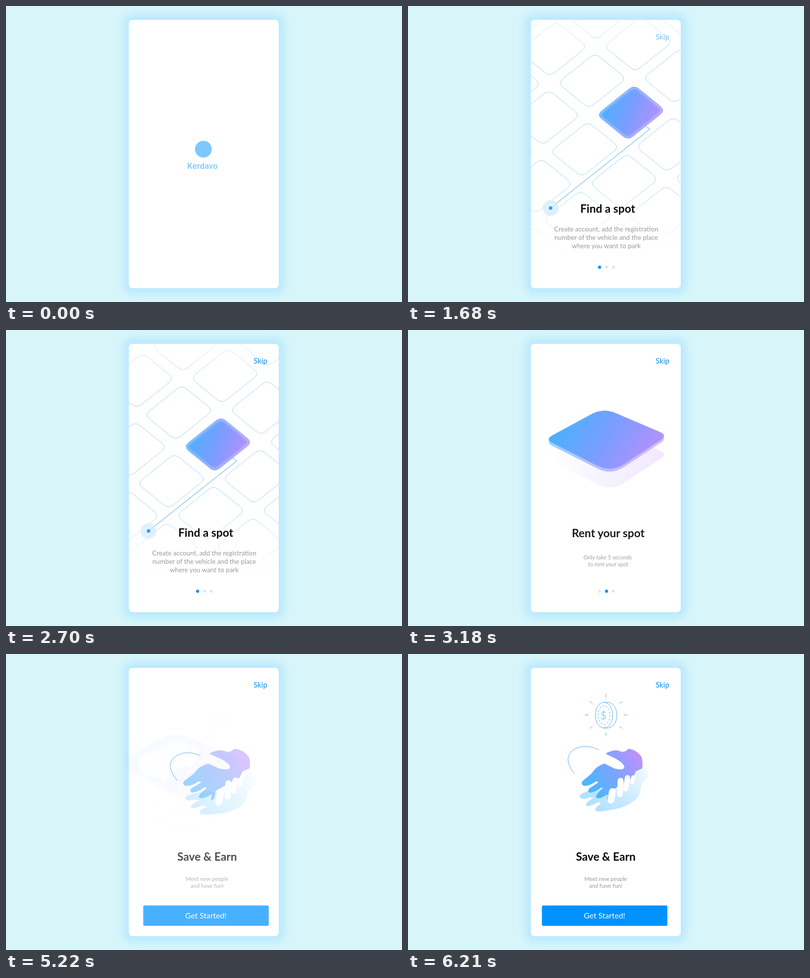
These frames come from a looping animation (800x600 px, 7.44 s). An HTML page:

```html
<!DOCTYPE html>
<html lang="en">
<head>
<meta charset="utf-8">
<title>Parking app onboarding</title>
<style>
html, body { margin: 0; width: 100%; height: 100%; overflow: hidden; background: #d8f6fa; }
svg { display: block; width: 100vw; height: 100vh; }
text { font-family: Lato, Carlito, sans-serif; text-anchor: middle; }
.title { font-weight: 700; font-size: 22.7px; fill: #0a0a0c; }
.body { fill: #999; }
.line { fill: none; stroke: #57ace2; stroke-width: 1; }
.draw { stroke-dasharray: 1; }
</style>
</head>
<body>
<svg viewBox="0 0 800 600">
  <defs>
    <filter id="glow" x="-20%" y="-20%" width="140%" height="140%"><feGaussianBlur stdDeviation="9"/></filter>
    <filter id="soft"><feGaussianBlur stdDeviation="2.5"/></filter>
    <clipPath id="card"><rect x="248" y="28" width="303" height="544" rx="8"/></clipPath>
    <linearGradient id="slab" x1="0" y1=".35" x2="1" y2=".65">
      <stop offset=".05" stop-color="#4cb0ff"/><stop offset=".5" stop-color="#7b9dff"/><stop offset="1" stop-color="#bd8efc"/>
    </linearGradient>
    <linearGradient id="under" x1="0" y1=".4" x2="1" y2=".6">
      <stop offset=".05" stop-color="#fff"/><stop offset=".45" stop-color="#f4f0ff"/><stop offset="1" stop-color="#ecdcff"/>
    </linearGradient>
    <linearGradient id="skin" x1="0" y1=".7" x2="1" y2=".2">
      <stop offset=".08" stop-color="#4db6fb"/><stop offset=".55" stop-color="#7fa3fd"/><stop offset=".95" stop-color="#bb92ff"/>
    </linearGradient>
    <linearGradient id="shade" x1="0" y1=".8" x2="1" y2=".2">
      <stop offset="0" stop-color="#aadfff"/><stop offset=".55" stop-color="#cdeaff"/><stop offset="1" stop-color="#eef9ff"/>
    </linearGradient>
    <linearGradient id="edges" gradientUnits="userSpaceOnUse" x1="0" y1="28" x2="0" y2="508">
      <stop offset="0" stop-color="#666"/><stop offset=".16" stop-color="#fff"/><stop offset=".7" stop-color="#fff"/>
      <stop offset=".9" stop-color="#444"/><stop offset="1" stop-color="#000"/>
    </linearGradient>
    <linearGradient id="sweep" gradientUnits="userSpaceOnUse" y1="0" y2="0">
      <stop offset="0" stop-color="#000"/><stop offset="1" stop-color="#fff"/>
    </linearGradient>
    <mask id="fade" maskUnits="userSpaceOnUse" x="0" y="0" width="800" height="600"><rect width="800" height="600" fill="url(#edges)"/></mask>
    <mask id="wipe" maskUnits="userSpaceOnUse" x="0" y="0" width="800" height="600"><rect width="800" height="600" fill="url(#sweep)"/></mask>
  </defs>

  <rect width="800" height="600" fill="#d8f6fa"/>
  <rect x="237" y="17" width="325" height="566" rx="16" fill="#b7e8fe" filter="url(#glow)"/>
  <rect x="248" y="28" width="303" height="544" rx="8" fill="#fff"/>

  <g clip-path="url(#card)">
    <g id="brand" fill="#0092ff">
      <circle cx="398" cy="284" r="29"/>
      <text x="395" y="352" style="font:500 29px Roboto,sans-serif">Kerdavo</text>
    </g>

    <g id="map" mask="url(#wipe)">
      <g mask="url(#fade)"><g id="grid" fill="none" stroke="#a6d3ee"></g></g>
      <path id="route" class="line" style="stroke:#3d9ce8"/>
      <g id="here"><circle r="16" fill="#d5ecfd" opacity=".75"/><circle r="3.6" fill="#319df0"/></g>
    </g>

    <g id="stack">
      <path id="layer" fill="url(#under)"/>
      <path id="base" class="line draw" pathLength="1" style="stroke:#9fcfec"
        d="M295 285Q284 295 300 303L388 346Q414 359 438 346L507 301Q520 291 509 279"/>
      <path id="side" fill="url(#slab)"/>
      <path id="top" fill="url(#slab)"/>
      <path id="rim" fill="none" stroke="#fff" stroke-width="6" filter="url(#soft)"/>
      <path id="hem" fill="none" stroke="#6f92ee"/>
      <path id="flag" class="line draw" pathLength="1"/>
      <path id="foot" d="M463.5 194V205" stroke="#fff" opacity=".7"/>
      <g id="auto">
        <path d="M336 212Q337 198 350 194L398 173Q420 167 440 178L458 185Q460 196 455 203L398 234L372 244Q345 236 338 230Z" fill="#fff" opacity=".72"/>
        <path d="M376 206L384 190Q402 175 425 174Q440 178 446 186Q430 197 376 212Z" fill="#9fa9ff" opacity=".2"/>
        <circle cx="405" cy="193" r="11" fill="#fff" opacity=".6"/>
        <path d="M346 198L374 208L366 223Q350 220 341 210Z" fill="#fff" opacity=".75"/>
        <path d="M338 217L350 222L350 229L340 226ZM361 228L374 231L371 239L361 236Z" fill="#fff" opacity=".7"/>
        <g id="wheels"></g>
      </g>
    </g>

    <g id="deal">
      <path id="sleeve" class="line" d="M385 194Q362 183 342 190Q324 197 323 214Q325 230 337 243"/>
      <path id="back" fill="url(#shade)" d="M473 227L461 236Q450 250 420 275L395 270L375 275Q345 282 347 290Q350 296 366 291L376 291Q356 302 361 308Q366 310 385 300L390 303Q376 312 379 318Q384 321 410 316Q440 312 462 294Q470 285 471 268Q473 261 485 248Q487 236 473 227Z"/>
      <path id="front" fill="url(#skin)" d="M399 202Q414 193 426 196Q437 202 445 192Q462 194 472 209Q475 222 473 232L460 238L455 250L426 268L411 277L408 292Q405 298 402 295L404 284Q394 290 388 292Q379 294 380 287Q384 280 394 272L391 270Q375 282 367 281Q361 278 367 272L385 260L380 258Q365 269 355 267Q348 264 353 257Q362 250 371 242Q380 227 397 222L417 232Q434 237 437 230Q437 222 421 213Z"/>
      <g id="fingers" stroke="#fff" stroke-linecap="round">
        <path d="M413 279L410 296" stroke-width="14"/><path d="M429.500 257L428 284" stroke-width="12"/>
        <path d="M443.500 251L440 273" stroke-width="11"/><path d="M455 250L453 260" stroke-width="8"/>
      </g>
    </g>

    <g id="coin" class="line">
      <g id="rays"></g>
      <ellipse cx="396" cy="124" rx="17.500" ry="26"/>
      <path d="M396 98H403A19 26 0 0 1 403 150H396"/>
      <ellipse cx="396" cy="124" rx="12" ry="19" stroke-dasharray="4 3"/>
      <text x="395" y="131.500" fill="#4aa5e6" stroke="none" font-size="21" font-weight="300">$</text>
    </g>

    <g id="copy1">
      <text class="title" x="403.500" y="419">Find a spot</text>
      <g class="body" font-size="13.400">
        <text x="400.500" y="457">Create account, add the registration</text>
        <text x="400.500" y="474">number of the vehicle and the place</text>
        <text x="400.500" y="491">where you want to park</text>
      </g>
    </g>
    <g id="copy2">
      <text class="title" x="402.500" y="420">Rent your spot</text>
      <g class="body" font-size="11.100">
        <text x="401.500" y="465">Only take 5 seconds</text>
        <text x="402.500" y="479">to rent your spot</text>
      </g>
    </g>
    <g id="copy3">
      <text class="title" x="399.500" y="419">Save &amp; Earn</text>
      <g class="body" font-size="11.300">
        <text x="399.500" y="459.500">Meet new people</text>
        <text x="399.500" y="474">and have fun!</text>
      </g>
      <rect x="270.500" y="509.800" width="253.500" height="41.200" rx="3" fill="#0093ff"/>
      <text x="397" y="535.500" fill="#fff" font-size="15.700">Get Started!</text>
    </g>

    <g id="dots" fill="#e3e6e8">
      <circle cx="387" cy="529.500" r="3"/><circle cx="401" cy="529.500" r="3"/><circle cx="415" cy="529.500" r="3"/>
      <circle id="dot" cy="529.500" r="3.200" fill="#0a93f8"/>
    </g>
    <text id="skip" x="514" y="68" font-size="15" fill="#0a8de8">Skip</text>
  </g>
</svg>
<script>
const LOOP = 7440;
const $ = id => document.getElementById(id);
const set = (id, attrs) => { for (const k in attrs) $(id).setAttribute(k, attrs[k]); };
const ramp = (t, a, b) => Math.min(1, Math.max(0, (t - a) / (b - a)));
const out = (k, n = 2) => 1 - (1 - k) ** n;
const smooth = k => k * k * (3 - 2 * k);
const mix = (a, b, k) => a + (b - a) * k;
const place = (id, opacity, x = 0, y = 0, extra = '') =>
  set(id, { opacity, transform: `translate(${x} ${y}) ${extra}` });

// Closed polygon whose corners are cut back by r[i] and rounded.
function rounded(pts, r) {
  const toward = (p, q, d) => {
    const k = d / Math.hypot(q[0] - p[0], q[1] - p[1]);
    return [mix(p[0], q[0], k), mix(p[1], q[1], k)];
  };
  return pts.map((p, i) => {
    const from = toward(p, pts[(i + 3) % 4], r[i]);
    const to = toward(p, pts[(i + 1) % 4], r[i]);
    return `${i ? 'L' : 'M'}${from}Q${p} ${to}`;
  }).join('') + 'Z';
}

// Corners run left, top, right, bottom.
const TILE = [[-69.2, 4.5], [6.2, -56], [69.2, -4.5], [-6.2, 56]];
const TILE_R = [13, 13, 13, 13];
const SLAB = [[274, 221], [393, 157], [526, 213], [410, 289]];
const SLAB_R = [17, 28, 18, 31];
const SLOPE = 0.797;

let tiles = '';
for (let i = -6; i <= 6; i++) for (let j = -5; j <= 6; j++) {
  if (!i && !j) continue;
  const x = 79 * i - 14.5 * j, y = 64.5 * i + 139 * j;
  if (Math.abs(x) < 420 && Math.abs(y) < 420)
    tiles += `<path d="${rounded(TILE, TILE_R)}" transform="translate(${x} ${y})"/>`;
}
$('grid').innerHTML = tiles;

$('wheels').innerHTML = [[387, 237], [439, 210]].map(([x, y]) =>
  `<ellipse cx="${x - 3}" cy="${y - 2}" rx="11" ry="13" fill="#a9b2ff" opacity=".45"/>
   <ellipse cx="${x}" cy="${y}" rx="10" ry="12" fill="#fff" opacity=".8"/>
   <ellipse cx="${x + 1}" cy="${y}" rx="8" ry="10" fill="#fff" stroke="#d9dcff" stroke-width=".8"/>`).join('');

$('rays').innerHTML = [0, 40, 90, 140, 180, 220, 270, 320].map(deg => {
  const a = deg * Math.PI / 180, c = Math.cos(a), s = Math.sin(a);
  return `<path d="M${400 + 35.5 * c} ${123.5 + 35.5 * s}L${400 + 43 * c} ${123.5 + 43 * s}"/>`;
}).join('');

function intro(t) {
  const k = out(ramp(t, 30, 330));
  const s = mix(0.585, 1, k);
  place('brand', mix(0.5, 1, k) * (1 - ramp(t, 1110, 1380)), 400, 299, `scale(${s}) translate(-400 -299)`);
}

function mapView(t) {
  const slide = 97 * (1 - ramp(t, 1080, 1800)) ** 2;
  const drive = 93.5 * (1 - ramp(t, 1080, 2700)) ** 3.33;
  const x = 428 + slide + drive, y = 232 - SLOPE * drive;
  const edge = mix(490, 180, smooth(ramp(t, 1080, 1500)));
  set('sweep', { x1: edge, x2: edge + 60 });
  set('map', { opacity: t < 1080 ? 0 : mix(0.48, 1, ramp(t, 1080, 1350)) * (1 - ramp(t, 2700, 3000)) });
  set('grid', { transform: `translate(${x} ${y})` });

  const ex = x + 38, ey = y + 33.5, hy = ey + SLOPE * (ex - 288);
  set('route', { d: `M${x + 29} ${y + 27}L${ex} ${ey}L288 ${hy}` });
  place('here', ramp(t, 1350, 1600), 288, hy);
  return [x, y];
}

function slabView(t, [x, y]) {
  const m = smooth(ramp(t, 2700, 3240));
  const pts = TILE.map((p, i) => [mix(p[0] + x, SLAB[i][0], m), mix(p[1] + y, SLAB[i][1], m)]);
  const d = rounded(pts, TILE_R.map((r, i) => mix(r, SLAB_R[i], m)));
  const seen = ramp(t, 1260, 1560);
  const leave = smooth(ramp(t, 4830, 5280));
  place('stack', seen * (1 - leave), -55 * leave);
  set('top', { d });
  set('side', { d, opacity: 0.6 * m, transform: `translate(0 ${6 * m})` });
  set('rim', { d, opacity: 0.4 * (1 - m) });
  set('hem', { d, opacity: 1 - m });
  set('layer', { d, opacity: ramp(t, 2940, 3300), transform: `translate(0 ${39 * m})` });

  const b = smooth(ramp(t, 3330, 3900)), f = smooth(ramp(t, 3420, 4050));
  set('base', { 'stroke-dashoffset': 1 - b, opacity: b ? 1 : 0 });
  const wave = 2.5 * Math.sin(ramp(t, 4350, 4800) * Math.PI * 2);
  set('flag', {
    d: `M463.5 179V118.5Q480 ${131.5 + wave} 505 ${131 + wave}Q492 ${150 + wave} 469 142`,
    'stroke-dashoffset': 1 - f, opacity: f ? 1 : 0
  });
  set('foot', { opacity: 0.7 * ramp(t, 3420, 3600) });

  const c = out(ramp(t, 4080, 4800)), dx = 24 - 39.4 * c;
  place('auto', Math.min(1, c * 1.65), dx, -dx / 2);
}

function handsView(t) {
  const enter = out(ramp(t, 4980, 5520), 3);
  place('deal', ramp(t, 4980, 5250), 34 * (1 - enter));
  const q = ramp(t, 5520, 6210);
  const m = Math.cos(4 * Math.PI * q) * (1 - q) ** 2;
  const tint = mix(0.5, 1, ramp(t, 5100, 5700));
  place('front', tint, 2 * m, 0, `translate(360 0) scale(${1 + 0.1 * m} 1) translate(-360 0)`);
  place('back', tint, 11 * m, 9 * m, `rotate(${5 * m} 416 270)`);
  place('fingers', 1, 14 * m, 5 * m);
  place('sleeve', 1, 4 * m, 11 * m, `rotate(${-2 * m} 416 250)`);
  const c = ramp(t, 5580, 5940);
  place('coin', c, 0, -18 * (1 - out(c)));
}

function copyView(t) {
  const page = (id, a, b, c, d) => {
    const i = out(ramp(t, a, b)), o = ramp(t, c, d);
    place(id, i * (1 - o), 24 * (1 - i) - 27 * smooth(o));
  };
  page('copy1', 1290, 1620, 2700, 3000);
  page('copy2', 2880, 3300, 4830, 5130);
  page('copy3', 5010, 5460, LOOP, LOOP + 1);
  set('dots', { opacity: ramp(t, 1320, 1620) * (1 - ramp(t, 4860, 5160)) });
  set('dot', { cx: 387 + 14 * smooth(ramp(t, 2760, 3150)) });
  set('skip', { opacity: ramp(t, 1500, 1830) });
}

function render(t) {
  intro(t);
  slabView(t, mapView(t));
  handsView(t);
  copyView(t);
}

const start = performance.now();
function tick(now) {
  render(Math.max(0, now - start) % LOOP);
  requestAnimationFrame(tick);
}
render(0);
requestAnimationFrame(tick);
</script>
</body>
</html>
```
